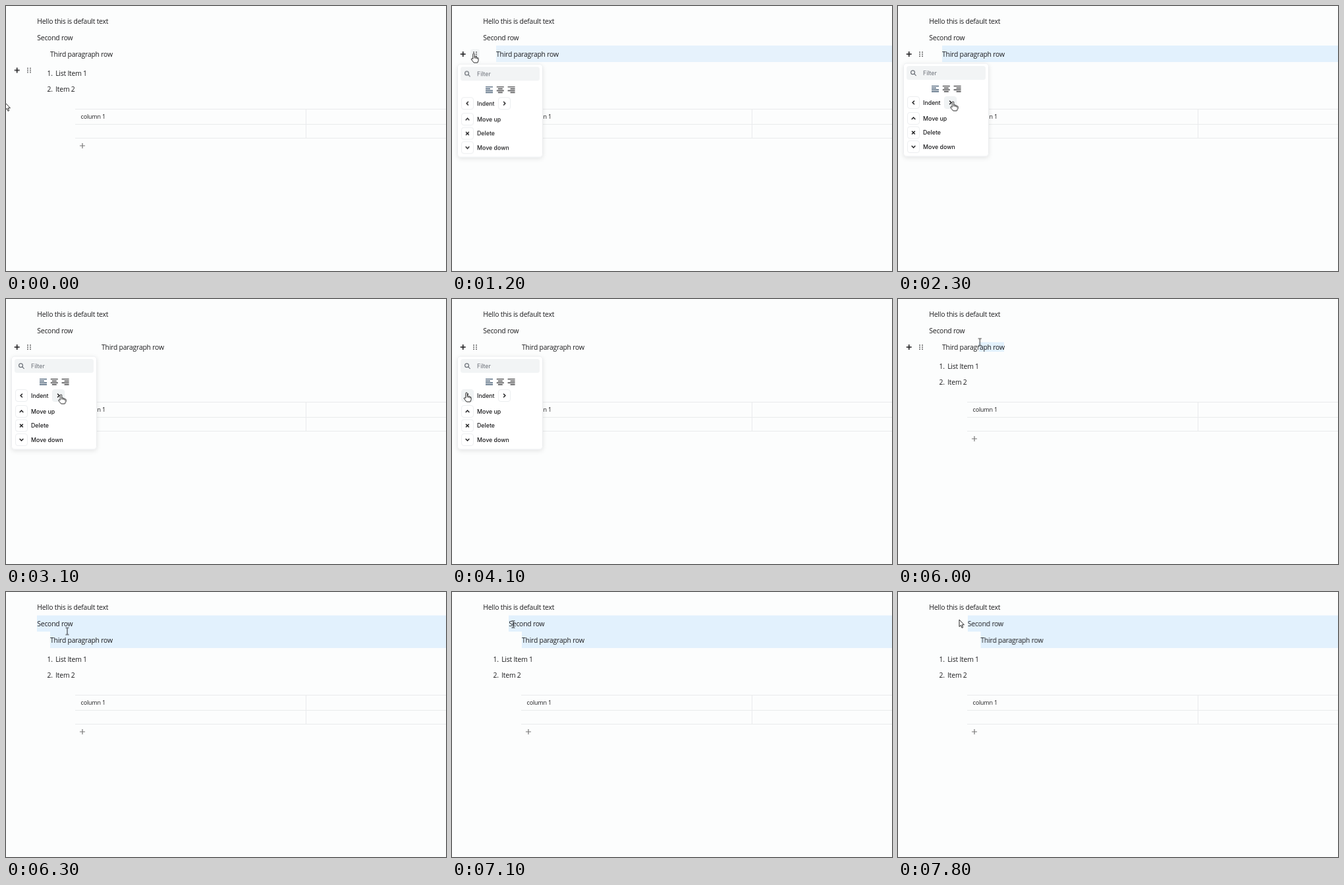
These frames come from a looping animation (668x402 px, 8000 ms). An HTML page:

```html
<!DOCTYPE html>
<html lang="en">
<head>
<meta charset="utf-8">
<title>Block editor</title>
<style>
  html, body { margin: 0; width: 100%; height: 100%; overflow: hidden; background: #fcfdfd; }
  svg { display: block; width: 668px; height: 402px; }
  text { font: 10.4px "Open Sans", "Noto Sans", sans-serif; letter-spacing: -.22px; fill: #1d1d1f; }
  .cell { font-size: 9px; letter-spacing: -.2px; }
  .menu text { font: 500 8.8px Inter, sans-serif; letter-spacing: 0; }
  .menu .hint { font-weight: 400; fill: #6b7078; }
  .line { fill: none; stroke: #1d1d1f; stroke-width: 1.2; }
  .rule { fill: none; stroke: #e9ebec; }
  .button { fill: #fff; stroke: #eceef0; }
  .hover { fill: #f0f3f4; }
  .mark { fill: #e2f1fd; }
  .pointer path { stroke-linejoin: round; }

  /* One loop is 8 s, so 1.25% is a tenth of a second. */
  .play { animation: 8s step-end infinite; }
  .off { opacity: 0; }

  .second { transform: translateX(47px); animation-name: second; }
  @keyframes second {
    85% { transform: translateX(66.5px); }
    88.75% { transform: translateX(86px); }
    92.5%, 100% { transform: translateX(105.5px); }
  }
  .third { transform: translateX(67px); animation-name: third; }
  @keyframes third {
    30%, 53.75% { transform: translateX(86.5px); }
    33.75%, 51.25% { transform: translateX(106px); }
    36.25%, 47.5% { transform: translateX(125.5px); }
    38.75% { transform: translateX(145px); }
    58.75% { transform: translateX(67px); }
    85% { transform: translateX(86.5px); }
    88.75% { transform: translateX(106px); }
    92.5%, 100% { transform: translateX(125.5px); }
  }
  .picked { animation-name: picked; }
  @keyframes picked { 77.5%, 100% { opacity: 1; } }
  .focused { animation-name: focused; }
  @keyframes focused {
    15% { opacity: .8; }
    16.25% { opacity: 1; }
    30% { opacity: 0; }
    77.5%, 100% { opacity: 1; }
  }
  .drag { transform-box: fill-box; transform-origin: right; animation-name: drag; }
  @keyframes drag {
    0% { opacity: 0; transform: scaleX(0); }
    71.25% { opacity: 1; transform: scaleX(0); animation-timing-function: steps(5, start); }
    77.5% { opacity: 1; transform: scaleX(1); }
    77.51%, 100% { opacity: 0; transform: scaleX(1); }
  }

  .tools { transform: translateY(97.5px); animation-name: tools; }
  @keyframes tools {
    7.5%, 11.25% { transform: translateY(73px); }
    8.75% { transform: translateY(48.5px); }
    77.5%, 100% { transform: translateY(73px); opacity: 0; }
  }
  .grip { animation-name: grip; }
  @keyframes grip { 12.5% { opacity: 1; } 21.25%, 100% { opacity: 0; } }
  .menu { animation-name: menu; }
  @keyframes menu {
    15% { opacity: 1; transform: translateY(1.3px); }
    16.25% { opacity: 1; transform: none; }
    68.75%, 100% { opacity: 0; }
  }
  .more { animation-name: more; }
  @keyframes more { 26.25% { opacity: 1; } 41.25%, 100% { opacity: 0; } }
  .less { animation-name: less; }
  @keyframes less { 45% { opacity: 1; } 58.75%, 100% { opacity: 0; } }

  .pointer { animation-name: pointer; }
  @keyframes pointer {
    0% { transform: translate(-1px, 147px); }
    6.25% { transform: translate(-1px, 147px); animation-timing-function: steps(3, start); }
    10% { transform: translate(17px, 52px); animation-timing-function: steps(3, start); }
    13.75% { transform: translate(33px, 72px); }
    20% { transform: translate(33px, 72px); animation-timing-function: steps(6, start); }
    27.5% { transform: translate(83.5px, 145px); }
    40% { transform: translate(83.5px, 145px); animation-timing-function: steps(5, start); }
    46.25% { transform: translate(22px, 142px); }
    58.75% { transform: translate(22px, 142px); animation-timing-function: steps(5, start); }
    65% { transform: translate(145.5px, 53px); }
    66.25% { transform: translate(145.5px, 53px); animation-timing-function: steps(3, start); }
    70% { transform: translate(166px, 73px); }
    71.25% { transform: translate(166px, 73px); animation-timing-function: steps(7, start); }
    80% { transform: translate(93px, 59.5px); animation-timing-function: steps(2, start); }
    82.5% { transform: translate(93px, 49px); }
    96.25% { transform: translate(93px, 49px); animation-timing-function: steps(2, start); }
    98.75%, 100% { transform: translate(93px, 42px); }
  }
  .arrow { animation-name: arrow; }
  @keyframes arrow { 12.5% { opacity: 0; } 92.5%, 100% { opacity: 1; } }
  .hand { animation-name: hand; }
  @keyframes hand { 12.5% { opacity: 1; } 62.5%, 100% { opacity: 0; } }
  .beam { animation-name: beam; }
  @keyframes beam { 62.5% { opacity: 1; } 92.5%, 100% { opacity: 0; } }
</style>
</head>
<body>
<svg viewBox="0 0 668 402">
  <defs>
    <filter id="shadow" x="-20%" y="-20%" width="140%" height="140%">
      <feDropShadow dx="0" dy="2" stdDeviation="3" flood-color="#0d1423" flood-opacity=".1"/>
    </filter>
    <rect id="button" x="-9" y="-9" width="18" height="18" rx="3.5"/>
    <path id="chevron" d="M-2.8 1.4 0-1.4 2.8 1.4"/>
  </defs>

  <text x="47.3" y="26.7">Hello this is default text</text>
  <g class="play second">
    <rect class="mark play picked off" y="35.5" width="668" height="24.6"/>
    <text x=".3" y="52">Second row</text>
  </g>
  <g class="play third">
    <rect class="mark play focused off" y="60" width="668" height="25"/>
    <rect class="mark play drag" x="46" y="65.5" width="48" height="14.5"/>
    <text y="76.7">Third paragraph row</text>
  </g>
  <text x="62.6" y="105.5">1.</text>
  <text x="75.2" y="105.5">List Item 1</text>
  <text x="62.6" y="129.7">2.</text>
  <text x="75.2" y="129.7">Item 2</text>

  <path class="rule" d="M105 156.5H668M105 179.5H668M105 200.5H668M455.5 156.5V200.5"/>
  <text class="cell" x="113.6" y="171.2">column 1</text>
  <path class="line" style="stroke:#777" d="M112 212H120M116 208V216"/>

  <g class="play tools">
    <path class="line" style="stroke-width:1.5" d="M12.7 0H20.7M16.7-4V4"/>
    <rect class="hover play grip off" x="28" y="-7.5" width="14" height="15" rx="3"/>
    <path class="line" style="stroke-width:1.7;stroke-linecap:round" d="M33-3h.01M37-3h.01M33 0h.01M37 0h.01M33 3h.01M37 3h.01"/>
  </g>

  <g class="menu play off">
    <rect x="8.5" y="87" width="129" height="141" rx="4.5" fill="#fff" stroke="#eceef0" filter="url(#shadow)"/>
    <rect x="13" y="91" width="120" height="21" rx="3.5" fill="#f2f4f5"/>
    <g class="line" style="stroke:#6b7078">
      <circle cx="22.5" cy="100.7" r="2.9"/>
      <path d="M24.7 102.9 27.6 105.8"/>
    </g>
    <text class="hint" x="38" y="104.8">Filter</text>

    <g class="line">
      <path style="stroke:#1f3b57" d="M51 121.5h11M51 124.3h7M51 127.1h11M51 129.9h11"/>
      <path d="M67.8 121.5h11M69.8 124.3h7M67.8 127.1h11M69.8 129.9h7"/>
      <path d="M84.6 121.5h11M88.6 124.3h7M84.6 127.1h11M88.6 129.9h7"/>
    </g>

    <g class="button">
      <use href="#button" x="23.5" y="146.5"/>
      <use href="#button" x="79.5" y="146.5"/>
      <use href="#button" x="23.5" y="170.5"/>
      <use href="#button" x="23.5" y="192"/>
      <use href="#button" x="23.5" y="213.5"/>
    </g>
    <use class="hover play less off" href="#button" x="23.5" y="146.5"/>
    <use class="hover play more off" href="#button" x="79.5" y="146.5"/>
    <g class="line" style="stroke-width:1.4">
      <use href="#chevron" transform="translate(23.5 146.5) rotate(-90)"/>
      <use href="#chevron" transform="translate(79.5 146.5) rotate(90)"/>
      <use href="#chevron" transform="translate(23.5 170.5)"/>
      <path d="M21 189.7l4.8 4.8M25.8 189.7l-4.8 4.8"/>
      <use href="#chevron" transform="translate(23.5 213.5) rotate(180)"/>
    </g>
    <text x="38" y="149.7">Indent</text>
    <text x="38" y="173.7">Move up</text>
    <text x="38" y="195.2">Delete</text>
    <text x="38" y="216.7">Move down</text>
  </g>

  <g class="pointer play" fill="#fff" stroke="#111" stroke-width=".9">
    <path class="play arrow" d="M0 0V10.6L2.4 8.4 4 12.4 5.7 11.7 4.1 7.8H7.4Z"/>
    <path class="play hand off" d="M-1.2 8.3V1.2a1.2 1.2 0 0 1 2.4 0V5q2-.6 2.2.7 1.8-.5 2 .8 1.7-.2 1.7 1.2V10.5L5.8 14H.2L-4 8.7q.7-1.7 2.8-.4ZM1.2 5V7.5M3.4 5.7V8M5.4 6.5V8.5"/>
    <path class="play beam off" fill="none" d="M-2.5-5.2H-.7L0-4.7.7-5.2H2.5M0-4.7V4.7M-2.5 5.2H-.7L0 4.7.7 5.2H2.5"/>
  </g>
</svg>
</body>
</html>
```
